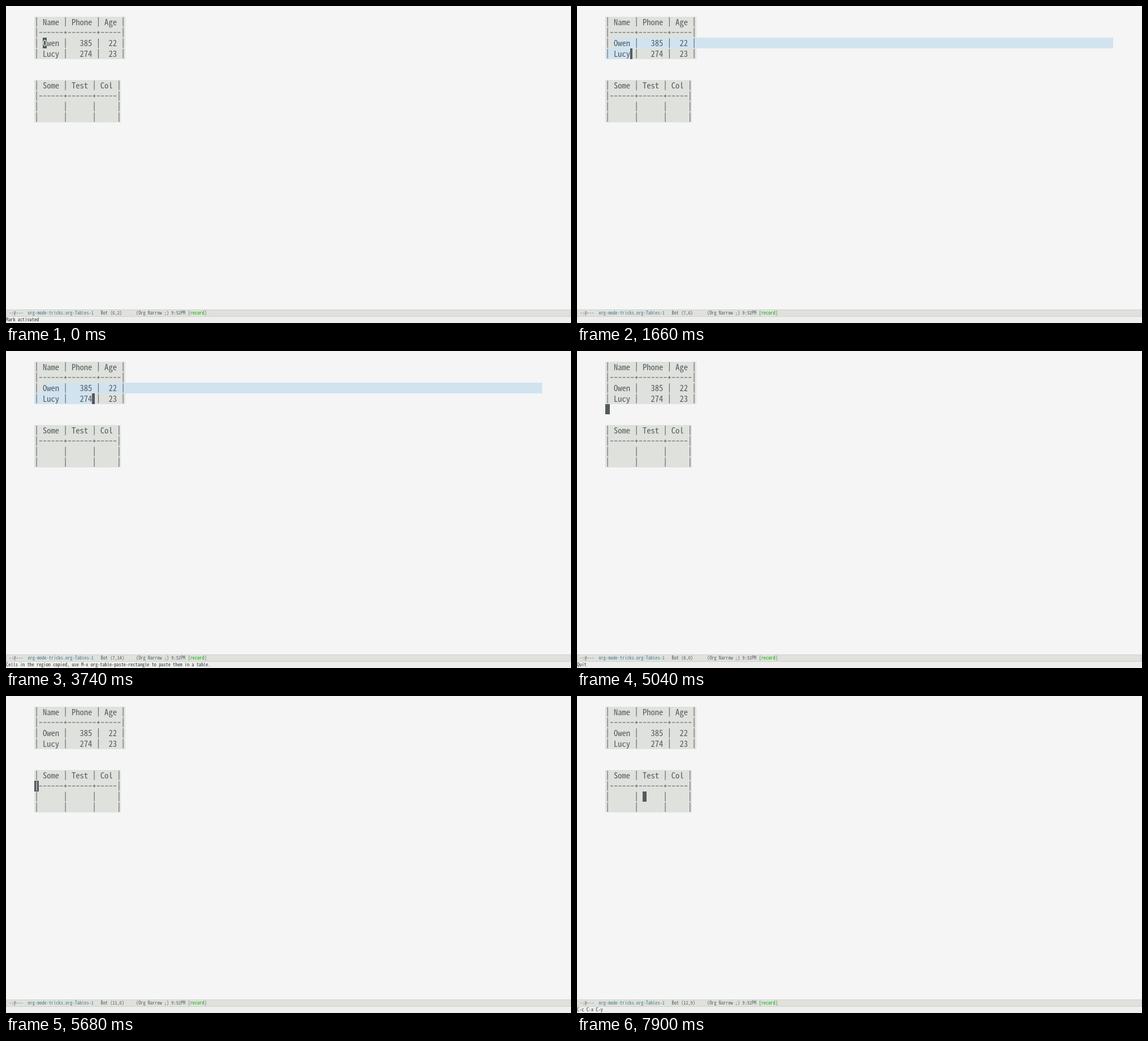
An HTML page that plays this animation: 999 px wide and 561 px high, repeating every 8000 ms.

```html
<!DOCTYPE html>
<html lang="en">
<head>
<meta charset="utf-8">
<title>Copying table cells</title>
<style>
  html, body { margin: 0; width: 100%; height: 100%; overflow: hidden; background: #f5f5f5; }
  svg { display: block; width: 999px; height: 561px; }
  text { white-space: pre; font: 28px "Noto Sans Mono CJK SC", "Noto Sans Mono CJK JP", "Noto Sans Mono", monospace;
         font-variant-ligatures: none; }
  .small { font-size: 16px; }
  .block { shape-rendering: crispEdges; }
</style>
</head>
<body>
<svg id="stage" viewBox="0 0 1920 1078.2"></svg>
<script>
// All lengths are in units of a 1920-wide screen, scaled down by the viewBox.
const LEFT = 97, RIGHT = 1822, CELL = 14, LINE = 36, SMALL_CELL = 8, LOOP = 8000;
const PAPER = '#f5f5f5', TABLE = '#dfe1dc', SELECTED = '#d2e3f0', INK = '#535c5f', CURSOR = '#535a5e';

const rows = {
  4: '| Name | Phone | Age |',
  5: '|------+-------+-----|',
  6: '| Owen |   385 |  22 |',
  7: '| Lucy |   274 |  23 |',
  10: '| Some | Test | Col |',
  11: '|------+------+-----|',
  12: '|      |      |     |',
  13: '|      |      |     |'
};

// Table rules drawn as bars inside a cell: x, y, width, height
const dash = [2, 17, 10, 2];
const rules = { '|': [[6, 2, 2, 32]], '-': [dash], '+': [dash, [6, 13, 2, 10]] };

const COPIED = 'Cells in the region copied, use M-x org-table-paste-rectangle to paste them in a table.';
const steps = [
  { at: 0, row: 6, col: 2, echo: 'Mark activated' },
  { at: 500, row: 7, col: 2, region: true },
  { at: 1660, row: 7, col: 6, region: true, width: 8 },
  { at: 3740, row: 7, col: 14, region: true, width: 8, echo: COPIED },
  { at: 4730, row: 8, col: 0, region: true, echo: COPIED },
  { at: 5040, row: 8, col: 0, echo: 'Quit' },
  { at: 5230, row: 9, col: 0 },
  { at: 5410, row: 10, col: 0 },
  { at: 5680, row: 11, col: 0 },
  { at: 6090, row: 12, col: 0 },
  { at: 6410, row: 12, col: 2 },
  { at: 7900, row: 12, col: 9, echo: 'C-c C-x C-y' }
];

const stage = document.getElementById('stage');
const colX = col => LEFT + col * CELL;
const rowY = row => (row - 3) * LINE;

function add(tag, attrs, content = '') {
  const node = document.createElementNS('http://www.w3.org/2000/svg', tag);
  for (const key in attrs) node.setAttribute(key, attrs[key]);
  node.textContent = content;
  stage.appendChild(node);
}
const block = (x, y, width, height, fill) =>
  add('rect', { x, y, width, height, fill, class: 'block' });
const label = (x, y, content, fill = INK) =>
  add('text', { x, y, fill, class: 'small' }, content);

function drawCells(row, col, chars, fill) {
  const left = colX(col), top = rowY(row);
  add('text', { x: left, y: top + 29, fill }, chars.replace(/[|+-]/g, ' '));
  [...chars].forEach((char, i) => {
    for (const [x, y, width, height] of rules[char] ?? [])
      add('rect', { x: left + i * CELL + x, y: top + y, width, height, fill });
  });
}

function drawRegion({ row, col }) {
  for (let r = 6; r <= row; r++) {
    const start = colX(r === 6 ? 2 : 0);
    const end = r < row ? RIGHT : colX(col);
    block(start, rowY(r), end - start, LINE, SELECTED);
  }
}

function drawCursor({ row, col, width = CELL }) {
  block(colX(col), rowY(row), width, LINE, CURSOR);
  drawCells(row, col, rows[row]?.[col] ?? ' ', PAPER);
}

function drawModeLine({ row, col }) {
  block(0, 1032, 1920, 25, '#cfd2cb');
  block(2, 1034, 1916, 21, TABLE);
  const put = (column, content, fill) => label(10 + column * SMALL_CELL, 1050, content, fill);
  put(0, '-:@---');
  put(8, 'org-mode-tricks.org-Tables-1', '#447a90');
  put(39, `Bot (${row},${col})`);
  put(54, '(Org Narrow ;) 9:52PM [');
  put(77, 'record', '#00b400');
  put(83, ']');
}

function draw(step) {
  stage.replaceChildren();
  for (const row in rows) block(LEFT, rowY(row), rows[row].length * CELL, LINE, TABLE);
  if (step.region) drawRegion(step);
  for (const row in rows) drawCells(row, 0, rows[row], INK);
  drawCursor(step);
  block(0, 1057, 1918, 22, '#eeeeed');
  drawModeLine(step);
  label(0, 1073, step.echo ?? '', '#2f3335');
}

let shown;
function tick() {
  const time = performance.now() % LOOP;
  const step = steps.findLast(s => s.at <= time);
  if (step !== shown) draw(shown = step);
  requestAnimationFrame(tick);
}
tick();
</script>
</body>
</html>
```
